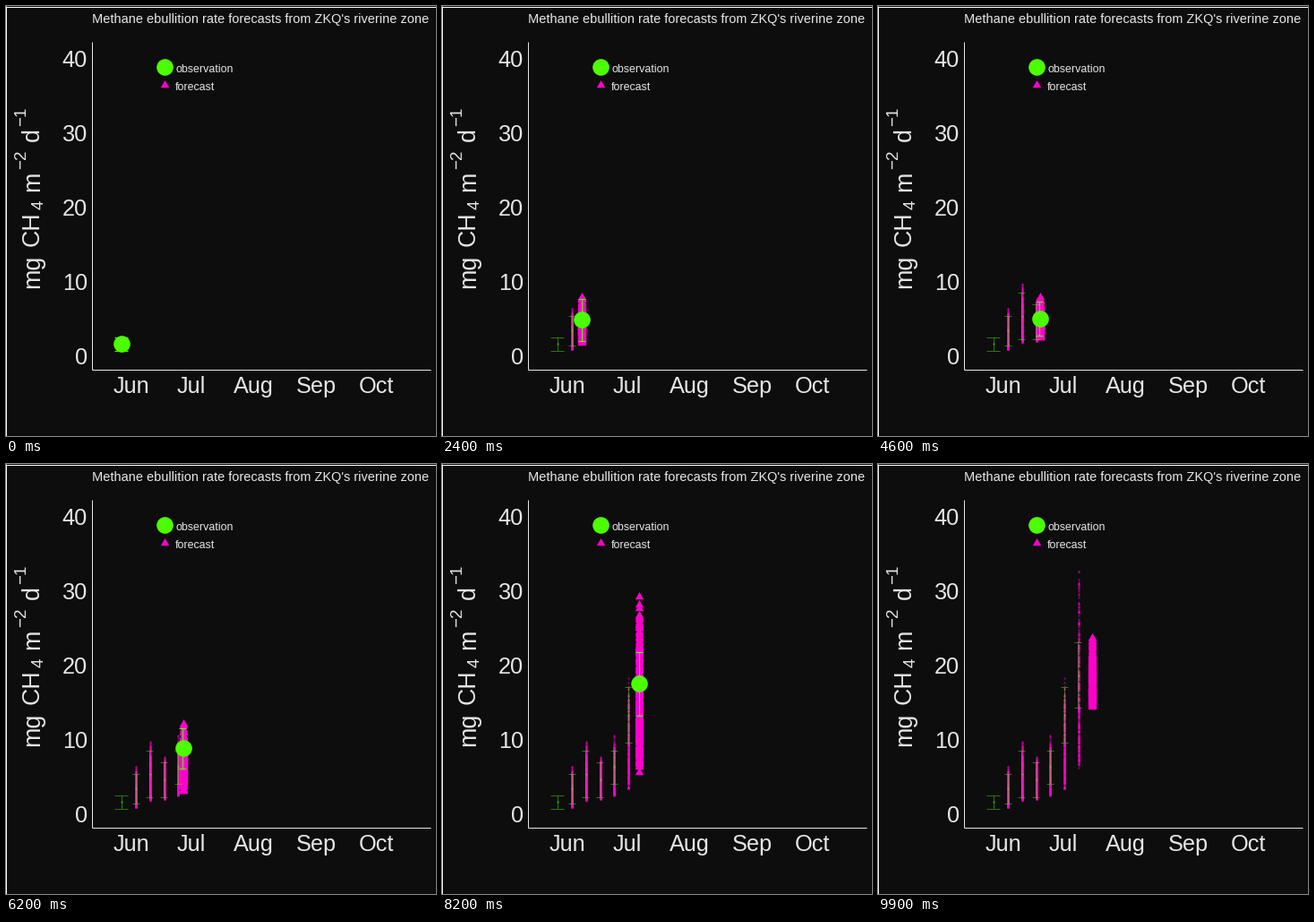
These frames come from a looping animation (480x480 px, 10 s). A matplotlib script:

```python
import numpy as np
import matplotlib.pyplot as plt
from matplotlib.animation import FuncAnimation
from matplotlib.path import Path

SIZE, FRAMES, STEP = 480, 100, 100
BG, INK = "#0d0d0d", "#e6e6e6"
GREEN, PINK = "#4cff00", "#ff00cc"
WEEKS, MEMBERS = 8, 300

# Weekly observations with their error, and the range of each forecast
OBSERVED = np.array([1.7, 3.5, 5.5, 4.7, 6.4, 13.4, 18.7])
ERROR = np.array([0.9, 2.0, 3.1, 2.3, 2.2, 3.7, 4.4])
LOW = np.array([1.0, 1.9, 2.1, 2.6, 3.5, 6.3, 14.5])
HIGH = np.array([6.4, 9.8, 7.8, 10.6, 18.3, 32.6, 23.7])

TRIANGLE = Path([(0, 1), (0.866, -0.5), (-0.866, -0.5), (0, 1)], closed=True)


def day_x(day):
    """Pixel column of a day counted from 1 June."""
    return 139.5 + 2.2457 * day


def rate_y(rate):
    return 390.5 - 8.325 * rate


KEYS = np.round(np.linspace(0, FRAMES - 1, WEEKS)).astype(int)
XS = day_x(7 * np.arange(WEEKS) - 4.7)
CAPS = np.where(np.arange(WEEKS) == 0, 7.5, 4)

# Skewed ensembles, scaled to fill each range; the first week has none
rng = np.random.default_rng(7)
spread = rng.beta(1.5, 2.4, (WEEKS - 1, MEMBERS))
spread -= spread.min(axis=1, keepdims=True)
spread /= spread.max(axis=1, keepdims=True)
ensemble = np.full((WEEKS, MEMBERS), np.nan)
ensemble[1:] = LOW[:, None] + (HIGH - LOW)[:, None] * spread

plt.rcParams["font.family"] = "Liberation Sans"
fig = plt.figure(figsize=(SIZE / 72, SIZE / 72), dpi=72, facecolor=BG)
ax = fig.add_axes([0, 0, 1, 1])
ax.set_xlim(0, SIZE)
ax.set_ylim(SIZE - 1, -1)
ax.axis("off")


def line(xs, ys, color=INK, **kw):
    return ax.plot(xs, ys, color=color, lw=1, solid_capstyle="butt",
                   snap=True, **kw)[0]


def marks(xs, ys, marker, size, color, **kw):
    return ax.plot(xs, ys, ls="", marker=marker, ms=size, color=color,
                   mew=0, antialiased=False, **kw)[0]


def label(x, y, text, size, ha="left", **kw):
    return ax.text(x, y, text, size=size, ha=ha, va="baseline", color=INK, **kw)


def bar(x, rate, error, cap):
    top, bottom = rate_y(rate + error), rate_y(rate - error)
    gap = np.nan
    return ([x - cap, x + cap, gap, x, x, gap, x - cap, x + cap],
            [top, top, gap, top, bottom, gap, bottom, bottom])


def mix(values, week, t):
    return values[week] + (values[week + 1] - values[week]) * t


# Fixed chart parts
edge = SIZE - 1
line([0, 0], [-1, SIZE], "white")
for y in (0, edge):
    line([0, SIZE], [y, y], "white")
line([96, 96], [39, 405])
line([96, 474], [405, 405])
label(95.5, 18, "Methane ebullition rate forecasts from ZKQ's riverine zone", 14.5)
for rate in range(0, 50, 10):
    label(91, rate_y(rate) + 9, str(rate), 25.3, "right")
for day, month in zip((0, 30, 61, 92, 122), ("Jun", "Jul", "Aug", "Sep", "Oct")):
    label(day_x(day), 431, month, 25.3, "center")

# Axis title, set piece by piece up the left side
cursor = 314
for text, baseline, size, gap in (
    ("mg", 37, 26.7, 9.5), ("CH", 37, 26.7, 2.5), ("4", 42, 18.7, 9.5),
    ("m", 37, 26.7, 2.5), ("\u22122", 22, 18.7, 9.5),
    ("d", 37, 26.7, 2.5), ("\u22121", 22, 18.7, 0),
):
    piece = label(baseline, cursor, text, size, rotation=90,
                  rotation_mode="anchor")
    cursor -= piece.get_window_extent().height + gap

marks([176.5], [67], "o", 18.6, GREEN)
marks([177], [87], TRIANGLE, 11, PINK)
label(189, 73, "observation", 12.4)
label(189, 93, "forecast", 12.4)

# Faint trail of past weeks
trail = []
for week, (rate, error) in enumerate(zip(OBSERVED, ERROR)):
    x = XS[week]
    trail.append([
        marks(np.full(MEMBERS, x + 0.5), rate_y(ensemble[week]), TRIANGLE, 3.8,
              PINK, alpha=0.45, zorder=2),
        line(*bar(x, rate, error, CAPS[week]), GREEN, alpha=0.45, zorder=4),
        marks([x + 0.5], [rate_y(rate)], "o", 2.4, GREEN, alpha=0.45, zorder=6),
    ])

# Moving parts
cloud = marks([], [], TRIANGLE, 11, PINK, zorder=3)
whisker = line([], [], GREEN, zorder=5)
dot = marks([], [], "o", 18.6, GREEN, zorder=7)


def draw(frame):
    week = min(np.searchsorted(KEYS, frame, side="right") - 1, WEEKS - 2)
    t = (frame - KEYS[week]) / (KEYS[week + 1] - KEYS[week])
    x = mix(XS, week, t)

    for key, parts in zip(KEYS, trail):
        for part in parts:
            part.set_visible(bool(frame > key))

    cloud.set_data(np.full(MEMBERS, x + 0.5), rate_y(mix(ensemble, week, t)))

    # With no next observation the last one stays put, then drops out
    last = week == len(OBSERVED) - 1
    for part in (dot, whisker):
        part.set_visible(bool(not last or t < 0.5))
    if last:
        week, t = week - 1, 1
        x = XS[week + 1]
    rate, error = mix(OBSERVED, week, t), mix(ERROR, week, t)
    dot.set_data([x + 0.5], [rate_y(rate)])
    whisker.set_data(*bar(x, rate, error, mix(CAPS, week, t)))
    return cloud, whisker, dot


anim = FuncAnimation(fig, draw, frames=FRAMES, interval=STEP,
                     repeat=True, repeat_delay=0, blit=False)
plt.show()
```
